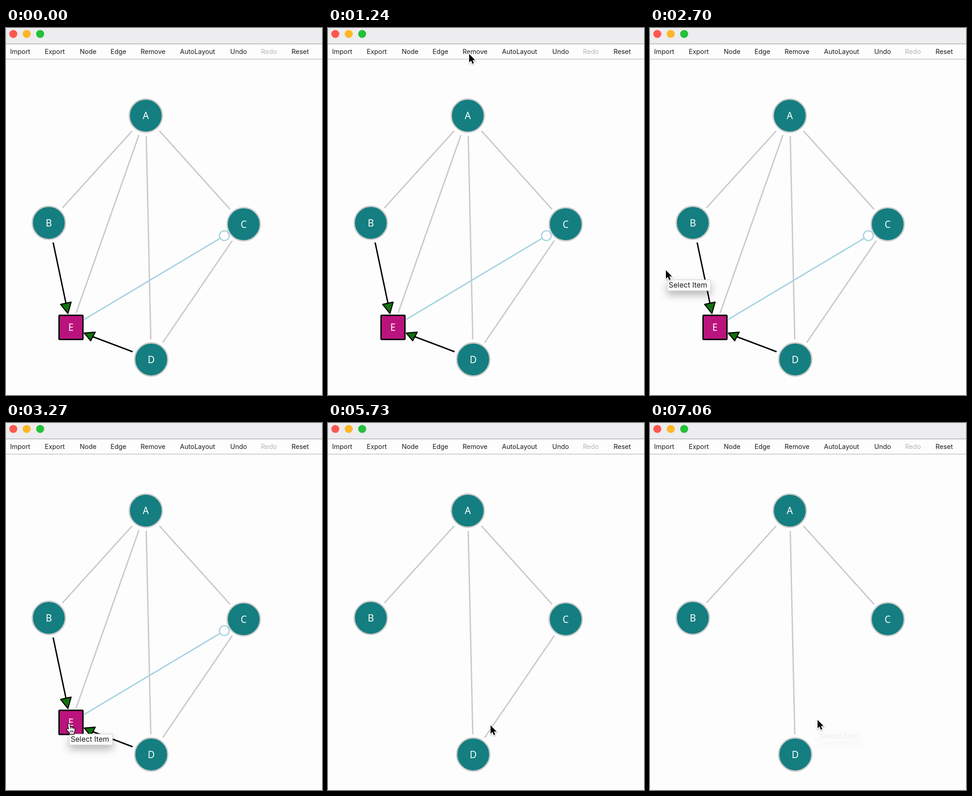
These frames come from a looping animation (694x806 px, 7090 ms). An HTML page:

```html
<!DOCTYPE html>
<html lang="en">
<head>
<meta charset="utf-8">
<title>Graph editor</title>
<style>
html, body { margin: 0; width: 100%; height: 100%; overflow: hidden; background: #fefdfe; }
svg { display: block; width: 694px; height: 806px; }
.ui { font-family: Inter, "Open Sans", sans-serif; fill: #1c1c1e; }
.label { font: 21px "Noto Sans", "Open Sans", sans-serif; fill: #fff; text-anchor: middle; }
.edge { stroke: #cacacc; stroke-width: 3; }
.arrow line { stroke: #000; stroke-width: 3; }
.arrow path { fill: #11730b; stroke: #000; stroke-width: 2.4; stroke-linejoin: round; }
</style>
</head>
<body>
<svg id="stage" viewBox="0 0 694 806">
  <defs>
    <filter id="tipShadow" x="-40%" y="-100%" width="180%" height="400%">
      <feDropShadow dx="0" dy="9" stdDeviation="9" flood-color="#000" flood-opacity=".28"/>
    </filter>
    <filter id="cursorShadow" x="-50%" y="-50%" width="200%" height="200%">
      <feDropShadow dx="0" dy="1.5" stdDeviation="1.2" flood-color="#000" flood-opacity=".35"/>
    </filter>
  </defs>
  <rect width="694" height="806" fill="#fefdfe"/>
  <rect width="694" height="34" fill="#edecee"/>
  <rect y="34" width="694" height="1.6" fill="#b2b1b3"/>
  <rect y="67.6" width="694" height="1.6" fill="#c3c3c5"/>
  <circle cx="16" cy="13" r="8.8" fill="#fe5850"/>
  <circle cx="45.5" cy="13" r="8.8" fill="#fdb626"/>
  <circle cx="75" cy="13" r="8.8" fill="#23c13a"/>
  <g id="menu" class="ui" font-size="14.4"></g>
  <g id="edges"></g>
  <g id="linkedE">
    <line class="edge" x1="292" y1="235" x2="154" y2="626"/>
    <g stroke="#a5d3df" stroke-width="3" fill="#fefdfe">
      <line x1="172" y1="640" x2="470" y2="462"/>
      <circle cx="479.5" cy="456" r="10.7" stroke-width="2.6"/>
    </g>
    <g class="arrow">
      <line x1="103.5" y1="471" x2="132" y2="606"/>
      <path d="M120 607L143 602L136 627Z"/>
      <line x1="278" y1="711" x2="188" y2="677"/>
      <path d="M172 670L196 668L186 687Z"/>
    </g>
    <rect x="116.5" y="631" width="52.5" height="53" rx="1.5" fill="#bb137d" stroke="#000" stroke-width="3"/>
    <text class="label" x="142.5" y="665">E</text>
  </g>
  <g id="nodes"></g>
  <g id="tooltip">
    <rect width="95" height="24" rx="1.5" fill="#fbfbfb" stroke="#c9c9c9" filter="url(#tipShadow)"/>
    <text class="ui" x="3" y="17.3" font-size="16">Select Item</text>
  </g>
  <g id="cursor" filter="url(#cursorShadow)">
    <path id="pointer" d="M0 0V18.6L4.3 14.6L7.2 21.4L10.3 20.1L7.4 13.4H13.2Z" fill="#000" stroke="#fff" stroke-width="2.6" paint-order="stroke"/>
    <g id="hand" stroke="#000" stroke-width="1.2" stroke-linejoin="round" fill="#fff">
      <path d="M-2 3.5Q-2.3 .8 0 .6Q2 .7 2.4 3L3.4 9Q5.6 7.4 7 9.4Q9.3 8.4 10.2 10.5Q13 10 13.2 13V16.5Q13 19.5 11.5 21.5V24.3H1.5V21.8Q-1.5 19-4 15.2Q-6 12.4-4 11.6Q-2.4 11.2-.6 13.5Z"/>
      <path d="M3.4 9V12.5M7 9.6V12.8M10.2 10.8V13.2M3.2 16V20.5M6.2 16V20.5M9 16V20.5" fill="none"/>
    </g>
  </g>
</svg>
<script>
const LOOP = 7090;
const REMOVE_NODE = 4000, REMOVE_EDGE = 6820, FADE = 260;
const $ = id => document.getElementById(id);

function add(parent, tag, attrs, text) {
  const el = document.createElementNS("http://www.w3.org/2000/svg", tag);
  for (const key in attrs) el.setAttribute(key, attrs[key]);
  if (text) el.textContent = text;
  return parent.appendChild(el);
}

[["Import", 9], ["Export", 85], ["Node", 162], ["Edge", 229.5], ["Remove", 295.5],
 ["AutoLayout", 382], ["Undo", 492.5], ["Redo", 560], ["Reset", 627]].forEach(([name, x]) =>
  add($("menu"), "text", { x, y: 57.3, fill: "#1c1c1e", style: name === "Redo" ? "fill:#b4b4b6" : "" }, name));

const edgeCD = [[277, 226, 124, 395], [308, 237, 318, 684], [337, 226, 492, 398], [497, 467, 344, 691]]
  .map(([x1, y1, x2, y2]) => add($("edges"), "line", { class: "edge", x1, y1, x2, y2 })).pop();

[["A", 307, 192.5], ["B", 94, 428], ["C", 522, 431], ["D", 319, 728]].forEach(([name, cx, cy]) => {
  add($("nodes"), "circle", { cx, cy, r: 36.4, fill: "#157e80", stroke: "#cbcbcb", "stroke-width": 3 });
  add($("nodes"), "text", { class: "label", x: cx, y: cy + 7.6 }, name);
});

// [time, x, y]
const cursorPath = [[30, 653, 672], [640, 420, 250], [760, 420, 250], [1240, 310, 57],
  [2000, 310, 57], [2480, 35, 532], [2740, 35, 532], [3260, 138, 659], [5330, 138, 659],
  [5730, 357, 664], [6000, 368, 652]];
const tooltipPath = [[2740, 38, 553], [3260, 139, 683], [4400, 139, 683], [4401, 370, 676]];

function along(path, t) {
  const next = path.findIndex(p => p[0] > t);
  if (next < 0) return path[path.length - 1].slice(1);
  if (next === 0) return path[0].slice(1);
  const [t0, x0, y0] = path[next - 1], [t1, x1, y1] = path[next];
  const u = (t - t0) / (t1 - t0), k = u * u * (3 - 2 * u);
  return [x0 + (x1 - x0) * k, y0 + (y1 - y0) * k];
}

const clamp = v => Math.max(0, Math.min(1, v));
const pulse = (t, start, end) => Math.min(clamp((t - start) / 50), clamp(1 - (t - end) / FADE));
const show = (el, on) => el.setAttribute("visibility", on ? "visible" : "hidden");
const move = (el, [x, y]) => el.setAttribute("transform", `translate(${x.toFixed(2)} ${y.toFixed(2)})`);

function render(t) {
  const overItem = (t >= 3180 && t < REMOVE_NODE) || (t >= 5940 && t < REMOVE_EDGE);
  show($("linkedE"), t < REMOVE_NODE);
  show(edgeCD, t < REMOVE_EDGE);
  move($("cursor"), along(cursorPath, t));
  $("cursor").setAttribute("opacity", t < 30 ? 0 : 1);
  show($("pointer"), !overItem);
  show($("hand"), overItem);
  move($("tooltip"), along(tooltipPath, t));
  $("tooltip").setAttribute("opacity", Math.max(pulse(t, 2630, REMOVE_NODE), pulse(t, 6080, REMOVE_EDGE)));
}

const start = performance.now();
function tick() {
  render((performance.now() - start) % LOOP);
  requestAnimationFrame(tick);
}
render(0);
requestAnimationFrame(tick);
</script>
</body>
</html>
```
